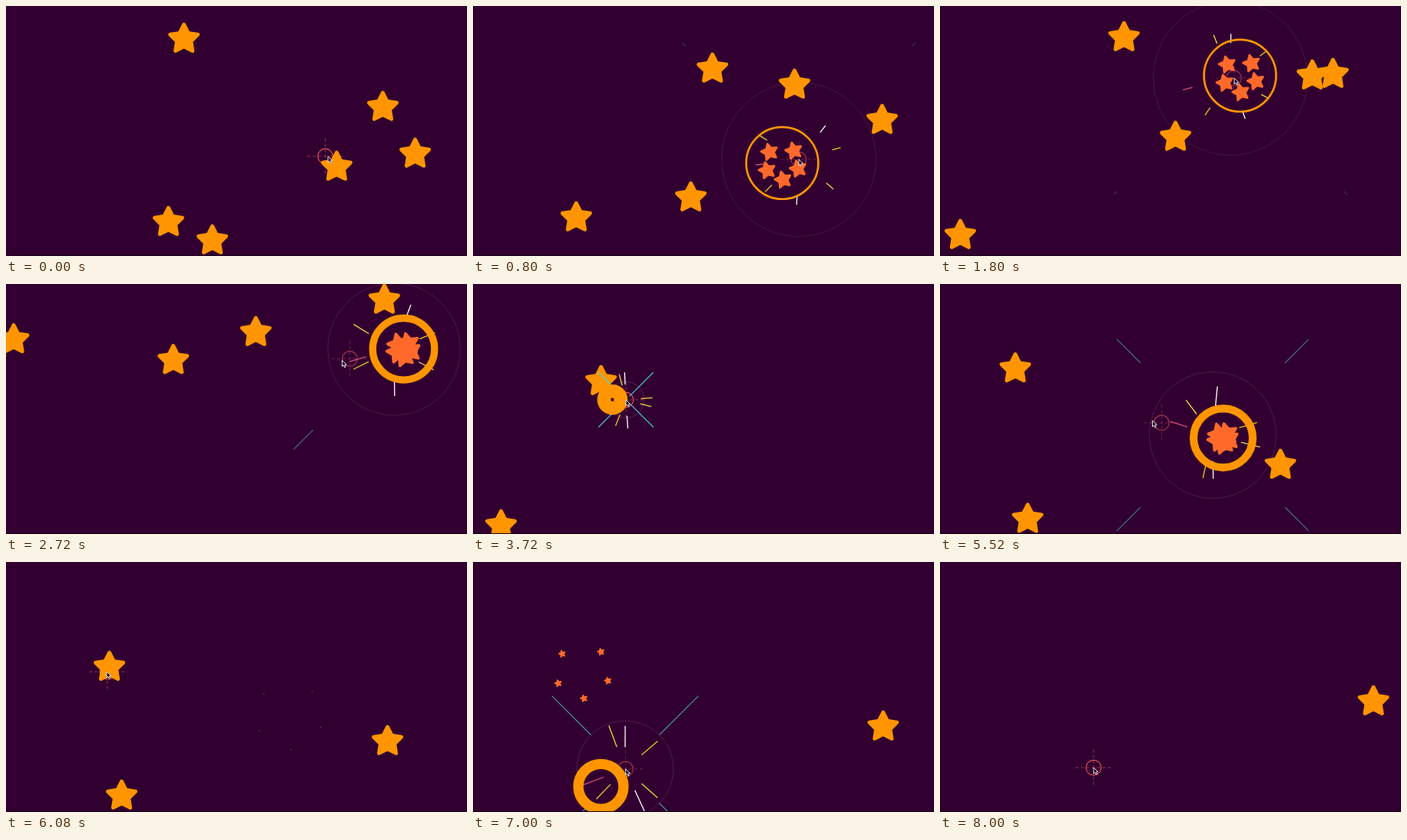
Recreate the animation shown at these times as an HTML page with a canvas. Size 600x326 px, loop 8.04 s.

```html
<!DOCTYPE html>
<html lang="en">
<head>
<meta charset="utf-8">
<title>Star shooting</title>
<style>
  html, body { margin: 0; width: 600px; height: 326px; overflow: hidden; background: #320030; }
  canvas { display: block; }
</style>
</head>
<body>
<canvas id="stage" width="600" height="326"></canvas>
<script>
const ctx = document.getElementById('stage').getContext('2d');
const LOOP = 8.04, TAU = Math.PI * 2, RAD = TAU / 360;
const ORANGE = '#ff9500', TINTS = ['#f0d44a', '#ffffff', '#e8c62c', '#d2507c'];

// Flight paths, keys are [seconds, x, y]. A path that ends on stage ends with a shot.
const flights = [
  [[0, 231, 42], [.8, 311, 81], [1.8, 484, 90], [2.32, 517, 84]],
  [[0, 490, 131], [.8, 418, 102], [1.2, 390, 90]],
  [[0, 532, 192], [.8, 532, 148], [1.8, 511, 88], [3.3, 480, -25]],
  [[0, 430, 209], [.2, 402, 204]],
  [[0, 268, 305], [.8, 283, 249], [1.8, 306, 170], [3.4, 338, -25]],
  [[0, 211, 281], [.8, 134, 275], [1.8, 26, 298], [2.3, -30, 315]],
  [[1.15, 232, -25], [1.8, 239, 40], [3.64, 181, 150]],
  [[2.5, -25, 60], [3.72, 166, 126], [4.92, 360, 236], [6.08, 496, 233], [LOOP, 565, 180]],
  [[3, 18, 350], [3.72, 36, 314], [4.92, 72, 307], [6.08, 150, 304], [6.75, 166, 292]],
  [[4.3, -25, 55], [4.92, 52, 82], [6.08, 134, 136], [6.2, 142, 142]],
  [[3.8, 185, 350], [4.92, 333, 202], [5.15, 368, 200]]
];

const pointer = [
  [-.04, 415, 196], [0, 419, 196], [.2, 424, 200], [.8, 424, 200],
  [1.2, 378, 94], [1.8, 383, 94], [2.32, 505, 85], [3.64, 199, 151],
  [4.4, 199, 151], [4.92, 305, 193], [5.15, 355, 197],
  [6.08, 131, 143], [6.2, 138, 154], [6.75, 198, 270], [LOOP, 200, 268]
];

const quadOut = p => 1 - (1 - p) ** 2;
const quadInOut = p => p < .5 ? 2 * p * p : 1 - 2 * (1 - p) ** 2;

function random(n) {
  const v = Math.sin(n * 12.9898 + 4.1) * 43758.5453;
  return v - Math.floor(v);
}

// Smooth curve through the keys without overshoot.
function follow(keys, t) {
  const last = keys.length - 1;
  if (t <= keys[0][0]) return keys[0].slice(1);
  if (t >= keys[last][0]) return keys[last].slice(1);
  const i = keys.findIndex(k => k[0] > t) - 1;
  const span = keys[i + 1][0] - keys[i][0];
  const u = (t - keys[i][0]) / span;
  return [1, 2].map(c => {
    const slope = k => (keys[k + 1][c] - keys[k][c]) / (keys[k + 1][0] - keys[k][0]);
    const tangent = k => {
      const a = slope(Math.max(k - 1, 0)), b = slope(Math.min(k, last - 1));
      return a * b <= 0 ? 0 : 2 * a * b / (a + b);
    };
    const a = keys[i][c], b = keys[i + 1][c];
    return a + (b - a) * u * u * (3 - 2 * u)
      + span * u * (1 - u) * ((1 - u) * tangent(i) - u * tangent(i + 1));
  });
}

const shots = flights.map(keys => keys[keys.length - 1])
  .filter(([, x, y]) => x > 0 && y > 0)
  .map(([t, x, y]) => ({ t, at: follow(pointer, t), star: [x + .5, y + .8] }));

function line(x1, y1, x2, y2) {
  ctx.beginPath();
  ctx.moveTo(x1, y1);
  ctx.lineTo(x2, y2);
  ctx.stroke();
}

function ray([x, y], deg, from, to) {
  const c = Math.cos(deg * RAD), s = Math.sin(deg * RAD);
  line(x + c * from, y + s * from, x + c * to, y + s * to);
}

function ring([x, y], r) {
  ctx.beginPath();
  ctx.arc(x, y, r, 0, TAU);
  ctx.stroke();
}

function star(x, y, size, color, turn = 0) {
  ctx.beginPath();
  for (let i = 0; i < 10; i++) {
    const r = size * (i % 2 ? .45 : .885), a = i * TAU / 10 - TAU / 4 + turn;
    ctx.lineTo(x + r * Math.cos(a), y + r * Math.sin(a));
  }
  ctx.closePath();
  ctx.fillStyle = ctx.strokeStyle = color;
  ctx.lineWidth = size * .23;
  ctx.lineJoin = 'round';
  ctx.fill();
  ctx.stroke();
}

function crosshair([x, y], alpha) {
  ctx.save();
  ctx.globalAlpha = alpha;
  ctx.lineWidth = 1;
  ctx.strokeStyle = '#8c3550';
  ctx.setLineDash([4, 3]);
  line(x - 23.5, y, x + 23.5, y);
  line(x, y - 23.5, x, y + 23.5);
  ctx.setLineDash([]);
  ctx.strokeStyle = '#e0505a';
  ctx.lineWidth = 1.2;
  ring([x, y], 9.8);
  ctx.restore();
}

function arrow([x, y]) {
  ctx.beginPath();
  [[0, 0], [0, 8], [1.9, 6.3], [3.2, 9.2], [4.6, 8.5], [3.4, 5.8], [5.8, 5.6]]
    .forEach(([dx, dy]) => ctx.lineTo(x + dx, y + dy));
  ctx.closePath();
  ctx.fillStyle = '#1c1020';
  ctx.strokeStyle = '#e4dce4';
  ctx.lineWidth = 1;
  ctx.fill();
  ctx.stroke();
}

// Faint circle, diagonal cross and coloured rays around the pointer.
function sparks({ t, at }, p) {
  ctx.lineWidth = 1;
  ctx.strokeStyle = `rgba(225,150,205,${.22 - .1 * p})`;
  ring(at, 101 * quadOut(p));

  ctx.globalAlpha = 1 - .85 * p;
  ctx.strokeStyle = '#4fd8e4';
  ctx.lineWidth = 1.2;
  const reach = 153 * Math.SQRT2;
  for (let deg = 45; deg < 360; deg += 90)
    ray(at, deg, reach * .975 * quadInOut(p), reach * quadOut(p));
  ctx.globalAlpha = 1;

  const count = 7;
  for (let i = 0; i < count; i++) {
    const seed = t * 10 + i;
    const r = 56 + 8 * random(seed + .5);
    ctx.strokeStyle = TINTS[i % TINTS.length];
    ctx.lineWidth = 1.3;
    ray(at, (i + random(seed)) * 360 / count, r * (.27 + .57 * p), r * (1 - (1 - p) ** 7));
  }
}

// Thinning ring, then five small stars that fly apart and shrink.
function burst({ star: [x, y] }, age) {
  const p = age / .65;
  if (p < 1) {
    ctx.strokeStyle = ORANGE;
    ctx.lineWidth = 19.5 * (1 - p) ** .77;
    ring([x, y], 47.2 * quadOut(p));
  }
  const q = (age - .27) / .68;
  if (q <= 0 || q >= 1) return;
  for (let i = -2; i <= 2; i++) {
    const a = (87 + 67 * i) * RAD, r = 45 * q;
    star(x + r * Math.cos(a), y + r * Math.sin(a), Math.min(16, 24 * (1 - q)), '#ff6a2b', -.25);
  }
}

function draw(t) {
  ctx.fillStyle = '#320030';
  ctx.fillRect(0, 0, 600, 326);

  const live = shots.map(shot => ({ shot, age: t - shot.t }))
    .filter(({ age }) => age >= 0 && age < .95);
  const busy = live.some(({ age }) => age > .1 && age < .7);
  crosshair(follow(pointer, t - .035), busy ? .65 : 1);

  for (const keys of flights) {
    if (t < keys[0][0] || t >= keys[keys.length - 1][0]) continue;
    const [x, y] = follow(keys, t);
    star(x + .5, y + 1.1, 21.4, ORANGE);
  }
  for (const { shot, age } of live) {
    if (age < .65) sparks(shot, age / .65);
    burst(shot, age);
  }
  arrow(follow(pointer, t));

  ctx.fillStyle = '#1c001a';
  ctx.fillRect(0, 325, 600, 1);
}

const start = performance.now();
function tick() {
  draw((performance.now() - start) / 1000 % LOOP);
  requestAnimationFrame(tick);
}
tick();
</script>
</body>
</html>
```
